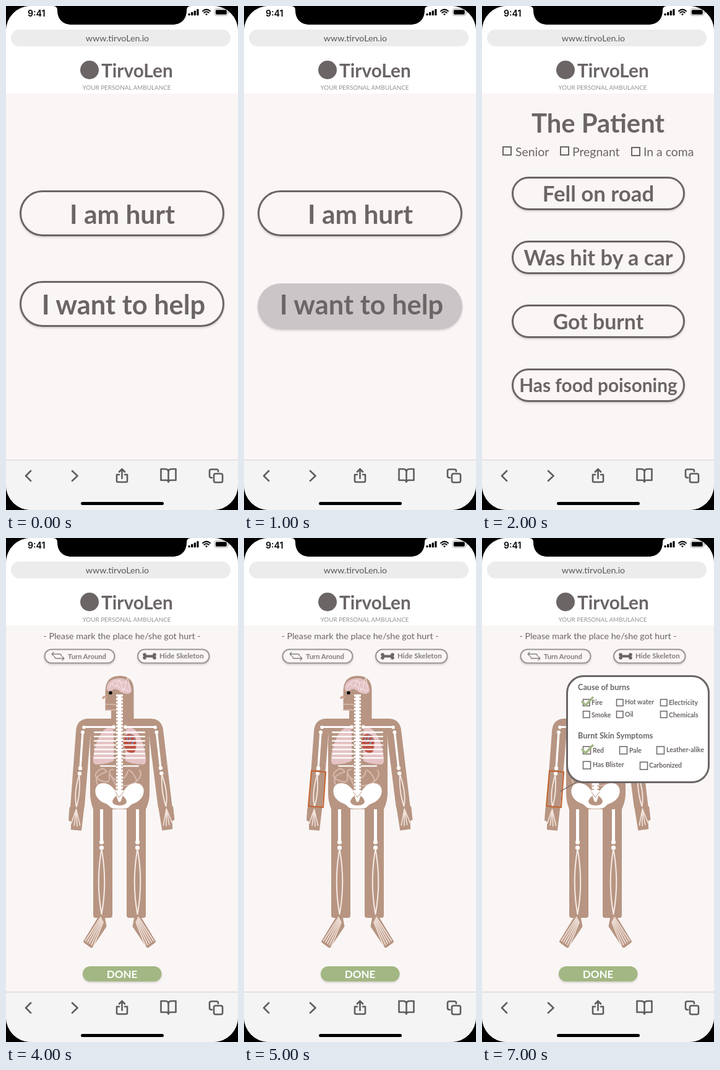
Write an HTML page that moves like this. It is 375 px wide and 812 px high and loops after 8000 ms.

```html
<!DOCTYPE html>
<html lang="en">
<head>
<meta charset="utf-8">
<title>First help app</title>
<style>
  html, body { margin: 0; width: 100%; height: 100%; overflow: hidden; background: #000; }
  svg { display: block; width: 375px; height: 812px; font-family: Lato, "Open Sans", sans-serif; }
  .line { fill: none; stroke-linecap: round; stroke-linejoin: round; }
  .shadow { filter: drop-shadow(0 2px 1.5px rgba(90, 80, 80, .22)); }
</style>
</head>
<body>
<svg id="stage" viewBox="0 0 375 812"></svg>
<script>
const INK = '#6b6566', PAPER = '#faf6f5', SKIN = '#b79582', GREEN = '#a2b783', SOFT = '#817c7d';

const text = (x, y, size, label, { weight = 700, anchor = 'start', fill = INK } = {}) =>
  `<text x="${x}" y="${y}" font-size="${size}" font-weight="${weight}" text-anchor="${anchor}" fill="${fill}">${label}</text>`;
const centered = (x, y, size, label, style) => text(x, y, size, label, { anchor: 'middle', ...style });
const line = (d, color = INK, width = 2, extra = '') =>
  `<path class="line" d="${d}" stroke="${color}" stroke-width="${width}" ${extra}/>`;
const rect = (x, y, w, h, r, attrs) => `<rect x="${x}" y="${y}" width="${w}" height="${h}" rx="${r}" ${attrs}/>`;
const dot = (x, y, r, fill = '#fff') => `<circle cx="${x}" cy="${y}" r="${r}" fill="${fill}"/>`;
const outlined = (x, y, w, h, r, stroke, color = INK) =>
  rect(x + stroke / 2, y + stroke / 2, w - stroke, h - stroke, r, `class="shadow" fill="${PAPER}" stroke="${color}" stroke-width="${stroke}"`);
const pressed = (x, y, w, h) => rect(x, y, w, h, h / 2, 'class="shadow" fill="#cac6c7"');
const checkbox = (x, y, size, stroke) => rect(x, y, size, size, 0, `fill="none" stroke="${INK}" stroke-width="${stroke}"`);
const show = (from, to, content) => `<g data-from="${from}" data-to="${to}">${content}</g>`;
const mirrored = (content, extra = '') => content + `<g transform="translate(367 0) scale(-1 1) ${extra}">${content}</g>`;

function statusBar() {
  const bars = [0, 1, 2, 3].map(i => rect(294.5 + i * 4.6, 12 - i * 2.3, 3.2, 3.3 + i * 2.3, 0.8, '')).join('');
  return `<path d="M76 0Q83 0 83 7C83 21 92 30 106 30H269C283 30 292 21 292 7Q292 0 299 0Z"/>
    <text x="35" y="17" font-size="14.2" font-weight="600" style="font-family:Inter,sans-serif">9:41</text>${bars}
    ${line('M318 8.2Q324 3 330 8.2M320.3 10.8Q324 7.6 327.7 10.8', '#000', 2)}<path d="M322 13Q324 11.4 326 13L324 15.3Z"/>
    ${rect(337, 4.5, 21.5, 11, 3, 'fill="none" stroke="#aaa"')}${rect(338.8, 6.3, 18, 7.4, 1.6, '')}
    ${line('M360.5 8.5V11.5', '#aaa', 1.4)}`;
}

function header() {
  return rect(0, 0, 375, 141, 0, 'fill="#fff"') + rect(8, 38, 355, 27, 13.5, 'fill="#ececec"')
    + centered(180, 57, 14.2, 'www.tirvoLen.io', { weight: 400, fill: '#5a5657' })
    + dot(135, 103, 15, INK) + text(154, 115, 29.8, 'TirvoLen')
    + centered(195, 135, 9.9, 'YOUR PERSONAL AMBULANCE', { weight: 400, fill: '#969192' });
}

function toolbar() {
  const icon = d => line(d, '#5f5c5d', 2.6);
  return rect(0, 731, 375, 81, 0, 'fill="#f4f4f4"') + line('M0 731.5H375', '#cfcfcf', 1)
    + icon('M40 749L32 757L40 765') + icon('M107 749L115.500 757L107 765')
    + icon('M183 755H179V765Q179 767 181 767H194Q196 767 196 765V755H192M187.500 761V747M183 750.500L187.500 746L192 750.500')
    + icon('M250.500 746H257.500Q262.500 746 262.500 751V767Q262.500 764 259 764H250.500ZM274.500 746H267.500Q262.500 746 262.500 751V767Q262.500 764 266 764H274.500Z')
    + icon('M333 760H332Q329 760 329 757V749Q329 746.500 332 746.500H340Q343 746.500 343 749V750')
    + rect(336, 753.5, 14, 14, 2.5, 'fill="none" stroke="#5f5c5d" stroke-width="2.6"')
    + rect(121, 799, 134, 5, 2.5, '');
}

function homePage() {
  const helpLabel = centered(190, 496.5, 43.4, 'I want to help');
  return show(0, 2, outlined(22, 297, 331, 74, 35.5, 3) + centered(188, 350.5, 42.5, 'I am hurt'))
    + show(0, 1, outlined(22, 443, 331, 74, 35.5, 3) + helpLabel)
    + show(1, 2, pressed(22, 447, 331, 74) + helpLabel);
}

function patientPage() {
  const choices = [['Fell on road', 315, 34.8], ['Was hit by a car', 418, 34.3], ['Got burnt', 521, 33.8], ['Has food poisoning', 622, 29.8]];
  const buttons = choices.map(([label, y, size], i) => {
    const top = 275 + i * 103, caption = centered(188, y, size, label);
    const normal = outlined(48, top, 280, 54, 25.5, 3) + caption;
    return label === 'Got burnt'
      ? show(2, 3, normal) + show(3, 4, pressed(48, top, 280, 54) + caption)
      : normal;
  });
  const flags = [[34, 227, 54, 'Senior'], [127, 227, 146, 'Pregnant'], [242, 228, 261, 'In a coma']]
    .map(([x, y, textX, label]) => checkbox(x, y, 13, 2) + text(textX, 241.5, 19.4, label, { weight: 400 }));
  return show(2, 4, centered(187.5, 204, 41.8, 'The Patient') + flags.join('') + buttons.join(''));
}

function arm() {
  const fingers = [0, 1, 2, 3].map(i => `M113.500 437L${105.5 + i * 4.7} ${463 - Math.abs(i - 1.6) * 2 + i}`).join('');
  return `<path fill="${SKIN}" d="M138 291H132Q114 292 113 312L104 433L102.500 434L101 455L105 457V470L122 471.500L126 437L127 432L136 322Z"/>`
    + line('M124 313L120 371', '#fff', 3.4) + dot(126, 305, 2.8) + dot(124, 313, 3) + dot(120, 371, 3.2) + dot(119, 379.5, 3.2)
    + line('M118.500 381Q109 412 114 433Q121 410 118.500 381', '#f5eae5', 1.8)
    + line(fingers, '#f1e2da', 1.7);
}

function leg() {
  const toes = [0, 1, 2, 3, 4].map(i => `M${153 + i} ${611 + i * 2}L${128.5 + i * 3.2} ${649 + i * 2.1}`).join('');
  return `<path fill="${SKIN}" d="M141 420H172V608Q172 612 168 612H160L162.500 626L140 659.500Q138 661 136 659.500L126 652Q124 650 126 648L148 612H145Q141 612 141 608Z"/>`
    + line('M154.500 416V487', '#fff', 5) + dot(154.5, 490, 3.6) + dot(154.5, 499, 3.6)
    + line('M154.500 501Q145 555 154.500 606Q164 555 154.500 501', '#f5eae5', 2)
    + line(toes, '#f1e2da', 1.7);
}

function head() {
  return `<path fill="${SKIN}" d="M160.500 278V246Q161 222 184 222Q206.500 222 206.500 246V293H170V278Z"/>
    <path fill="#e4c3c6" d="M163 245C161 232 172 226 184 226C197 226 203 236 203 246Q202 252 194 251Q187 250 183 246Q177 241 172 245Q166 248 163 245Z"/>`
    + line('M167 240Q170 232 174 237T181 233T187 239T194 234T199 242M172 234Q178 227 184 231T195 232M187 245Q191 241 195 245T201 244M177 239Q181 236 185 243', '#f5e2e3', 1.1)
    + line('M157 257.500Q160 254.500 162 257', '#cfa08f', 3.4)
    + line('M161 268H174Q180 268 181 276M161 277H178', '#d9bdb0', 1.3) + dot(169, 249.5, 2.7, '#000');
}

function organs() {
  const ribs = [0, 1, 2, 3, 4, 5, 6, 7]
    .map(i => `M${i < 7 ? 143 : 153} ${313 + i * 6.9 + (i === 7 ? 6 : 0)}H177`).join('');
  const lung = '<path fill="#e5c3c5" d="M170 306C159 302 149 319 144 338C140 354 139 365 146 365Q166 364 174 359V314Q174 308 170 306Z"/>';
  const hip = '<path fill="#fff" d="M178 411C172 393 148 389 144.500 405C143 416 151 424 159 427Q165 429 168 433Q172 437 184 436V431Q172 431 172 424Q174 418 178 416Z"/>';
  return mirrored(lung)
    + '<path fill="#bd5444" d="M193 318Q199 313 207 318Q213 327 209 343Q205 349 196 344Q189 336 191 325Z"/>'
    + line('M196 319V326M203 317L199 329M208 323L203 333', '#7f91b5', 1.8)
    + line('M148 397Q143 387 151 382T163 377Q157 367 148 376T154 391T167 385T175 393T165 402M173 373Q164 373 169 382T184 389T196 378T207 382T203 398M216 374Q221 382 213 390T193 399T183 379', '#d8b9ad', 2)
    + mirrored(line(ribs, '#fff', 2.3) + line('M127 304.500H173', '#fff', 3) + dot(174, 304.5, 3))
    + line('M183.500 254V409', '#fff', 6, 'style="stroke-linecap:butt"')
    + line('M183.500 252V410', '#fff', 11, 'stroke-dasharray="3.5 2" style="stroke-linecap:butt"')
    + mirrored(hip)
    + '<path fill="#fff" d="M176 407H191L186 423Q183.500 428 181 423Z"/>'
    + line('M177 409L183 418L190 409', SKIN, 1);
}

function body() {
  return mirrored(leg()) + mirrored(arm(), 'rotate(2.500 126 304)')
    + `<path fill="${SKIN}" d="M132 291H236Q230 315 232 330V412Q232 424 226 437H141Q136 424 136 412V330Q138 315 132 291Z"/>`
    + head() + organs();
}

function popup() {
  const options = [
    [163, 260, 177, 269, 'Fire'], [217, 260, 231, 268, 'Hot water'], [288, 260, 302, 269, 'Electricity'],
    [163, 279, 177, 289, 'Smoke'], [217, 279, 231, 288, 'Oil'], [288, 279, 302, 289, 'Chemicals'],
    [163, 336, 179, 346, 'Red'], [222, 336, 238, 346, 'Pale'], [282, 336, 298, 345, 'Leather-alike'],
    [163, 360, 179, 369, 'Has Blister'], [255, 361, 270, 370, 'Carbonized'],
  ].map(([x, y, textX, base, label]) => checkbox(x + .5, y, y < 300 ? 10.5 : 12, 1.5) + text(textX, base, 10.5, label));
  return line('M127 408L153 393', INK, 1.3)
    + rect(137.5, 222.5, 229, 171, 27, `fill="#fff" stroke="${INK}" stroke-width="3"`)
    + text(155, 245, 12.7, 'Cause of burns') + text(155, 323, 12.7, 'Burnt Skin Symptoms') + options.join('');
}

function bodyPage() {
  const chip = (x, w) => outlined(x, 178.5, w, 24, 11, 2, '#9a9596');
  const loop = line('M77 184L74 187L77 190M74.500 187H87Q89.500 187 89.500 190M91 191L94 194L91 197M93.500 194H81Q78.500 194 78.500 191', '#858081', 1.3);
  const bone = line('M226 190.500H238', INK, 4) + [224, 240].map(x => dot(x, 188, 2.8, INK) + dot(x, 193, 2.8, INK)).join('');
  return show(4, 8, centered(187.5, 163, 14.25, '- Please mark the place he/she got hurt -', { weight: 400 })
    + chip(61.5, 115) + loop + text(100, 194.5, 11.2, 'Turn Around', { fill: SOFT })
    + chip(212, 117.5) + bone + text(248, 194, 11.5, 'Hide Skeleton', { fill: SOFT })
    + body()
    + rect(124, 690, 127.5, 24.5, 12.2, `class="shadow" fill="${GREEN}"`) + centered(187.5, 708.5, 17, 'DONE', { fill: '#fff' }))
    + show(5, 8, line('M109 375L132 377L128 434L104 432Z', '#c4622d', 2))
    + show(6, 8, popup())
    + show(7, 8, line('M162 264L167.500 269.500L179 257M162 341L167.500 346.500L179 334', GREEN, 3.4));
}

const stage = document.getElementById('stage');
stage.innerHTML = `<clipPath id="screen">${rect(0, 0, 375, 812, 40, '')}</clipPath>
  <g clip-path="url(#screen)">${rect(0, 0, 375, 812, 0, `fill="${PAPER}"`)}
  ${header()}${homePage()}${patientPage()}${bodyPage()}${toolbar()}${statusBar()}</g>`;

const timed = [...stage.querySelectorAll('[data-from]')];
const start = performance.now();
let shownStep = -1;

function draw() {
  const step = Math.floor((performance.now() - start) / 1000) % 8;
  if (step !== shownStep) {
    for (const part of timed) {
      part.style.display = step >= +part.dataset.from && step < +part.dataset.to ? '' : 'none';
    }
    shownStep = step;
  }
  requestAnimationFrame(draw);
}
draw();
</script>
</body>
</html>
```
